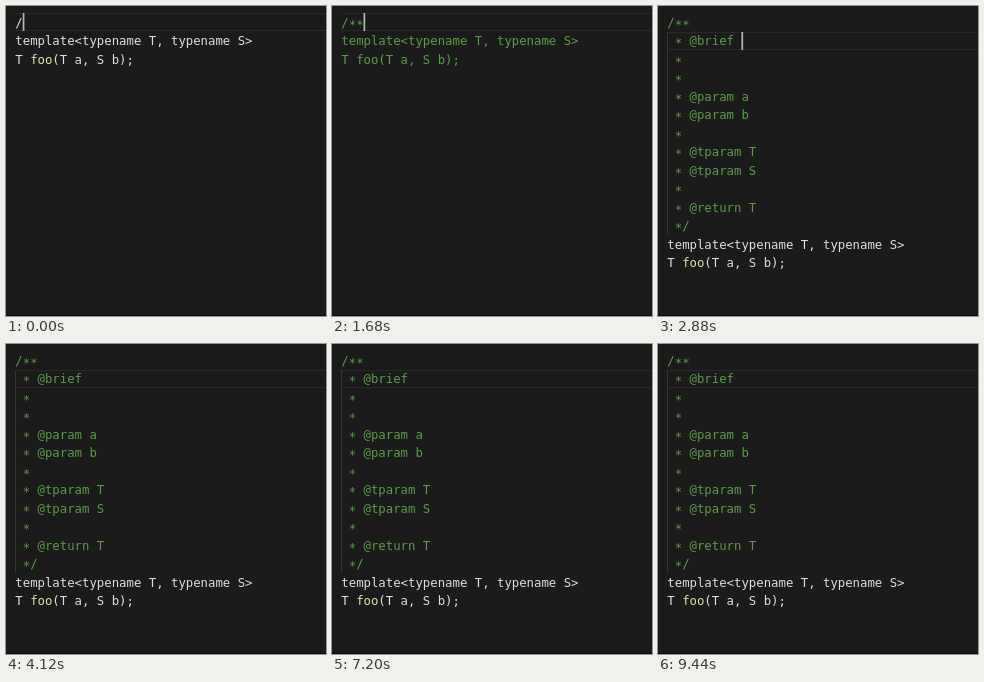
Recreate the animation shown at these times as an HTML page with a canvas. Size 320 by 310 pixels, loop 9480 ms.

```html
<!DOCTYPE html>
<html lang="en">
<head>
<meta charset="utf-8">
<title>Doc comment completion</title>
<style>
  html, body { margin: 0; width: 100%; height: 100%; overflow: hidden; background: #1b1b1b; }
  canvas { display: block; width: 320px; height: 310px; }
</style>
</head>
<body>
<canvas id="stage"></canvas>
<script>
const LOOP = 9480;
const LEFT = 9.3, TOP = 7.5, ROW = 18.5, BASELINE = 13.4;
const FONT = '12.32px "DejaVu Sans Mono", monospace';
const WHITE = '#dedede', GREEN = '#5c9c48', YELLOW = '#dfe3a6';

// Moments of the typing, in ms
const STAR = 1280, COMMENTED = 1320, SECOND_STAR = 1520, ENTER = 2200, COMPLETE = 2440;
const FIRST_HIDE = 3890, BLINK = 1220;

const DECLARATION = ['template<typename T, typename S>', 'T foo(T a, S b);'];
const COMMENT = ['/**', ' * @brief ', ' *', ' *', ' * @param a', ' * @param b', ' *',
  ' * @tparam T', ' * @tparam S', ' *', ' * @return T', ' */'];

const canvas = document.getElementById('stage');
const ctx = canvas.getContext('2d');
const scale = window.devicePixelRatio || 1;
canvas.width = 320 * scale;
canvas.height = 310 * scale;

function editorState(t) {
  if (t < ENTER) {
    const opening = t < STAR ? '/' : t < SECOND_STAR ? '/*' : '/**';
    return { comment: [opening], open: t >= COMMENTED, row: 0, col: opening.length, caret: true };
  }
  if (t < COMPLETE) return { comment: ['/**', ''], open: true, row: 1, col: 0, caret: true };
  const hidden = t >= FIRST_HIDE && Math.floor((t - FIRST_HIDE) / BLINK) % 2 === 0;
  return { comment: COMMENT, open: false, row: 1, col: 10, caret: !hidden, guide: true };
}

function rect(x, y, w, h, color) {
  ctx.fillStyle = color;
  ctx.fillRect(x, y, w, h);
}

// Asterisks sit lower, at the middle of the line
function drawLine(text, row, color) {
  let x = LEFT;
  for (const part of text.split(/(\*|foo)/)) {
    ctx.fillStyle = part === 'foo' && color === WHITE ? YELLOW : color;
    ctx.fillText(part, x, TOP + row * ROW + BASELINE + (part === '*' ? 2 : 0));
    x += ctx.measureText(part).width;
  }
}

function draw(t) {
  const { comment, open, row, col, caret, guide } = editorState(t);
  const y = Math.floor(TOP + row * ROW);
  ctx.setTransform(scale, 0, 0, scale, 0, 0);
  ctx.font = FONT;
  rect(0, 0, 320, 310, '#1b1b1b');
  rect(0, 309, 320, 1, '#090909');
  rect(9, y, 311, 1, '#292929');
  rect(9, y + 17, 311, 1, '#292929');
  if (guide) rect(9, 26, 1, 203, '#363636');

  const commentColor = open || comment.length > 1 ? GREEN : WHITE;
  comment.forEach((line, i) => drawLine(line, i, commentColor));
  DECLARATION.forEach((line, i) => drawLine(line, comment.length + i, open ? GREEN : WHITE));
  if (caret) rect(LEFT + col * ctx.measureText('0').width, y, 1.7, 18, '#b4b5b3');
}

const start = performance.now();
function tick() {
  draw((performance.now() - start) % LOOP);
  requestAnimationFrame(tick);
}
tick();
</script>
</body>
</html>
```
